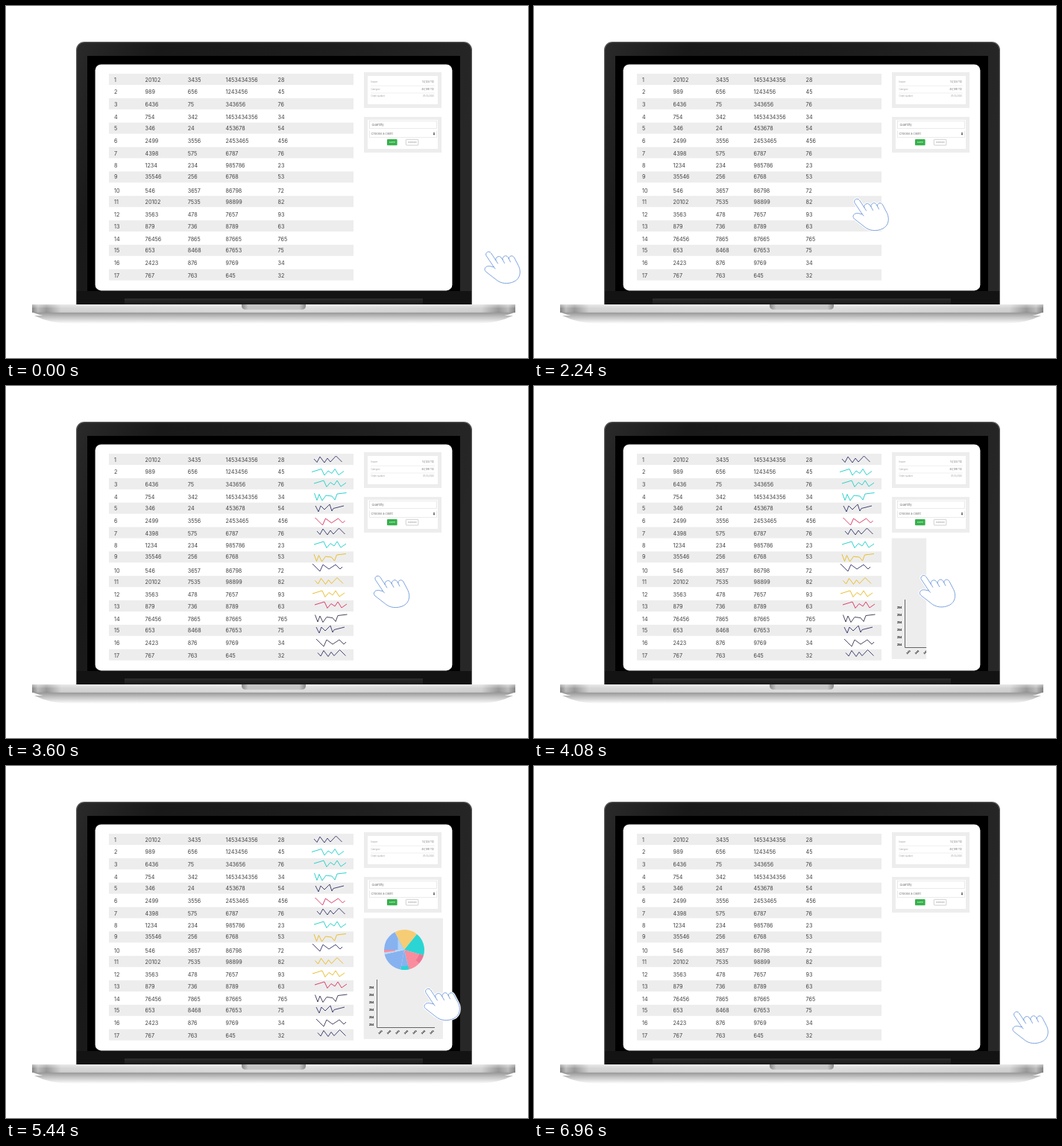
These frames come from a looping animation (700 by 473 pixels, 7.12 s). An HTML page:

```html
<!DOCTYPE html>
<html lang="en">
<head>
<meta charset="utf-8">
<title>Laptop dashboard</title>
<style>
html, body { margin: 0; width: 100%; height: 100%; overflow: hidden; background: #fff; }
svg { display: block; width: 100%; height: 100%; }
text { font-family: Inter, Roboto, sans-serif; fill: #404040; }
.cell { font-size: 7.2px; }
.tiny { font-size: 2.8px; fill: #999; }
.sum { font-size: 3.5px; fill: #777; }
.field { font-size: 4px; fill: #707070; }
.label { font-size: 3.2px; font-weight: 800; fill: #111; }
.line { fill: none; stroke-width: 1; stroke-linejoin: round; }
</style>
</head>
<body>
<svg id="stage" viewBox="0 0 700 473">
  <defs>
    <linearGradient id="lid" x1="0" y1="0" x2="1" y2=".3">
      <stop offset="0" stop-color="#2b2a2b"/><stop offset=".2" stop-color="#1a191a"/>
      <stop offset=".6" stop-color="#1e1d1e"/><stop offset="1" stop-color="#282728"/>
    </linearGradient>
    <linearGradient id="hinge" x2="0" y2="1">
      <stop offset="0" stop-color="#2e2d2e"/><stop offset="1" stop-color="#191819"/>
    </linearGradient>
    <linearGradient id="bar">
      <stop offset="0" stop-color="#858586"/><stop offset=".012" stop-color="#bcbcbd"/>
      <stop offset=".03" stop-color="#9a9a9b"/><stop offset=".06" stop-color="#d4d4d5"/>
      <stop offset=".5" stop-color="#e0e0e1"/><stop offset=".93" stop-color="#d2d2d3"/>
      <stop offset=".965" stop-color="#9a9a9b"/><stop offset=".985" stop-color="#bcbcbd"/>
      <stop offset="1" stop-color="#858586"/>
    </linearGradient>
    <linearGradient id="shade" x2="0" y2="1">
      <stop offset="0" stop-color="#fff" stop-opacity=".5"/><stop offset=".5" stop-color="#fff" stop-opacity="0"/>
      <stop offset="1" stop-color="#000" stop-opacity=".06"/>
    </linearGradient>
    <linearGradient id="under" x2="0" y2="1">
      <stop offset="0" stop-color="#949495"/><stop offset="1" stop-color="#cfcfd0"/>
    </linearGradient>
    <linearGradient id="notch">
      <stop offset="0" stop-color="#8a8a8b"/><stop offset=".1" stop-color="#c6c6c7"/>
      <stop offset=".9" stop-color="#c6c6c7"/><stop offset="1" stop-color="#8a8a8b"/>
    </linearGradient>
    <linearGradient id="floor" x2="0" y2="1">
      <stop offset="0" stop-color="#b4b4b4"/><stop offset="1" stop-color="#fff"/>
    </linearGradient>
    <clipPath id="sparkClip"><rect id="sparkWipe" x="405" y="85" height="290"/></clipPath>
    <clipPath id="panelClip"><rect id="panelWipe" x="479" y="200" height="170"/></clipPath>
    <clipPath id="trendClip"><rect id="trendWipe" x="500" y="280" height="75"/></clipPath>
    <mask id="pieMask" maskUnits="userSpaceOnUse" x="500" y="215" width="70" height="65">
      <circle id="pieWipe" cx="534" cy="247" r="14" fill="none" stroke="#fff" stroke-width="28"
        pathLength="100" transform="rotate(-90 534 247)"/>
    </mask>
  </defs>

  <rect width="700" height="473" fill="#fff"/>
  <path d="M38 416H680Q658 427 630 427H88Q60 427 38 416Z" fill="url(#floor)"/>
  <path d="M94 402V59A11 11 0 0 1 105 48H614A11 11 0 0 1 625 59V402Z" fill="#58585a"/>
  <path d="M95.2 402V59A10 10 0 0 1 105 49.2H614A10 10 0 0 1 623.8 59V402Z" fill="url(#lid)"/>
  <rect x="95.2" y="383" width="528.6" height="19" fill="#141314"/>
  <rect x="109" y="67" width="500" height="316" fill="#000"/>
  <rect x="159" y="393" width="400" height="9" fill="url(#hinge)"/>
  <rect x="119.6" y="78.5" width="478.8" height="303.9" rx="8" fill="#fff"/>
  <path d="M35 411.5H683Q664 419.5 636 419.5H82Q54 419.5 35 411.5Z" fill="url(#under)"/>
  <rect x="35" y="401" width="648" height="11" fill="url(#bar)"/>
  <rect x="35" y="401" width="648" height="11" fill="url(#shade)"/>
  <path d="M316 401H402V403Q402 408 396 408H322Q316 408 316 403Z" fill="url(#notch)"/>

  <g id="table"></g>

  <g id="cards">
    <path d="M480 89h104v48h-104zM480 149h104v48h-104z" fill="#ededed"/>
    <path d="M485 94h94v38h-94zM485 153h94v39h-94z" fill="#fff"/>
    <path d="M489 107.2H575M489 117H575" stroke="#e6e6e6" stroke-width=".6"/>
    <text class="tiny" x="489.5" y="102.5">Import</text>
    <text class="tiny" x="489.5" y="112.5">Category</text>
    <text class="tiny" x="489.5" y="122.2">Order number</text>
    <g text-anchor="end">
      <text class="sum" x="574" y="103">14,124 112</text>
      <text class="sum" x="574" y="113">46,198 112</text>
      <text class="tiny" x="574" y="122.4">07/12/2020</text>
    </g>
    <rect x="487.5" y="154.5" width="90" height="10" fill="none" stroke="#e2e2e2" stroke-width=".7"/>
    <path d="M487.5 167.5V176.5H577.5V167.5" fill="none" stroke="#e2e2e2" stroke-width=".7"/>
    <text class="field" x="490.5" y="161.4">Quantity</text>
    <text class="field" x="489.5" y="173.2">Choose a client</text>
    <path d="M572.7 171.4l1.3-1.8 1.3 1.8zM572.7 172l1.3 1.8 1.3-1.8z" fill="#444"/>
    <rect x="511" y="179" width="13.6" height="8.3" rx="1" fill="#34b14b"/>
    <text x="517.8" y="184.2" text-anchor="middle" style="font-size:2.5px;fill:#fff">Submit</text>
    <rect x="536.3" y="179.3" width="16.6" height="7.8" rx="1" fill="#fff" stroke="#b0b0b0" stroke-width=".6"/>
    <text x="544.6" y="184.2" text-anchor="middle" style="font-size:2.5px;fill:#888">Download</text>
  </g>

  <g id="results">
    <g id="sparks" clip-path="url(#sparkClip)"></g>
    <g id="panel" clip-path="url(#panelClip)">
      <rect x="479.7" y="204.5" width="106.3" height="162.3" fill="#ededed"/>
      <path d="M497.5 287V351.5H575" fill="none" stroke="#555" stroke-width=".9"/>
    </g>
    <g id="pie" mask="url(#pieMask)"></g>
    <g clip-path="url(#trendClip)">
      <path class="line" stroke="#d8365d" d="M504 347L508.5 329.5L515.5 337L519 321L521.5 324L522 317L525 322L526 306L534 318L537 308L547 322V297L553 304V292L558.5 307L560 293L566 293.5L568 288L570 290.5L572 286.5L573.5 287"/>
    </g>
  </g>

  <g id="hand" stroke-linejoin="round" stroke-linecap="round">
    <path id="halo" fill="#fff" stroke="#fff" stroke-width="3"/>
    <path id="outline" fill="#fff" stroke="#7099dc" stroke-width=".9"/>
    <path d="M15 13L17.5 17M24 12L26.5 16.5M32.5 11L34.5 15M12 21.5L14 24" fill="none" stroke="#7099dc" stroke-width=".9"/>
  </g>
</svg>

<script>
const $ = id => document.getElementById(id);

function add(parent, tag, attrs, text) {
  const el = document.createElementNS('http://www.w3.org/2000/svg', tag);
  for (const key in attrs) el.setAttribute(key, attrs[key]);
  if (text !== undefined) el.textContent = text;
  return $(parent).appendChild(el);
}

// Each row: vertical centre, then its values
const rows = `99 20102 3435 1453434356 28
115.5 989 656 1243456 45
132 6436 75 343656 76
149 754 342 1453434356 34
164.2 346 24 453678 54
181 2499 3556 2453465 456
198 4398 575 6787 76
214.5 1234 234 985786 23
229.7 35546 256 6768 53
248 546 3657 86798 72
263.2 20102 7535 98899 82
280 3563 478 7657 93
296.8 879 736 8789 63
313.6 76456 7865 87665 765
328.8 653 8468 67653 75
345.5 2423 876 9769 34
362.2 767 763 645 32`.split('\n');
const columns = [145, 186.5, 243.7, 294.5, 364.5];

rows.forEach((row, i) => {
  const [mid, ...values] = row.split(' ');
  if (i % 2 === 0) add('table', 'rect', { x: 138, y: 91 + i * 16.42, width: 328, height: 15, fill: '#ededed' });
  [i + 1, ...values].forEach((value, c) =>
    add('table', 'text', { class: 'cell', x: columns[c], y: +mid + 2.6 }, value));
});

// Sparkline shapes, relative to their first point
const shapes = {
  A: 'l4 4.5 4-7.5 6 8 4-6 4 5 7.5-8 8 8',
  B: 'l13-4 4 8.5 5-6 5 3.5 4-6 5 8 7-5',
  C: 'l3.5 9.5 3-8 4 8.5 5-7 8 1 4 5 3-8 12.5-1.5',
  D: 'l4 8 3-8 5 5 7-7 3 9 2-3.5 14-3.5',
  E: 'l10 10 4-9 8 6 9-6 6 6 3-3'
};
const navy = '#444477', ink = '#47475f', cyan = '#2bd3cd', gold = '#eabf30', red = '#de406a';
[['A', 413, 98, navy], ['B', 410, 115.5, cyan], ['B', 413, 131, cyan], ['C', 413.5, 144, cyan],
 ['D', 415, 161, navy], ['E', 414.5, 177, red], ['A', 417, 195, navy], ['B', 413, 213, cyan],
 ['C', 413, 226, gold], ['E', 411, 239, navy], ['A', 414.5, 261.5, gold], ['B', 411, 279, gold],
 ['B', 414, 294, red], ['C', 414.5, 307.5, ink], ['D', 416, 324, navy], ['E', 416, 340, ink],
 ['A', 418, 358.5, navy]
].forEach(([shape, x, y, stroke]) =>
  add('sparks', 'path', { class: 'line', d: `M${x} ${y}${shapes[shape]}`, stroke }));

for (let i = 0; i < 6; i++) add('panel', 'text', { class: 'label', x: 487, y: 299.2 + i * 9.9 }, '254');
for (let i = 0; i < 7; i++) {
  const x = 502 + i * 11.5;
  add('panel', 'text', { class: 'label', x, y: 358.8, 'text-anchor': 'middle', transform: `rotate(-45 ${x} 357.6)` }, '345');
}

function slice(from, to, fill, inner = 0, outer = 27) {
  const at = (deg, r) => {
    const a = deg * Math.PI / 180;
    return `${534 + r * Math.sin(a)} ${247 - r * Math.cos(a)}`;
  };
  add('pie', 'path', {
    fill,
    d: `M${at(from, inner)}L${at(from, outer)}A${outer} ${outer} 0 0 1 ${at(to, outer)}L${at(to, inner)}` +
       `A${inner} ${inner} 0 0 0 ${at(from, inner)}Z`
  });
}
slice(-28, 39, '#f6cd74');
slice(39, 106, '#2bd5d3');
slice(106, 166, '#f98d9e');
slice(106, 132, '#ee7593', 21);
slice(166, 190, '#86b2ef');
slice(166, 190, '#2bd5d3', 22);
slice(190, 257, '#86b2ef');
slice(257, 270, '#b8d8f8');
slice(263, 270, '#f98d9e', 12);
slice(270, 332, '#86b2ef');
add('pie', 'path', { d: 'M534 247L525.5 231.5V247Z', fill: '#aed3f8' });

const palm = 'M12 21.5L2 6.5C0 2.5 5.5-1 8.5 3L15 13C13.5 9 19 5.5 22 9L24 12C23 8 28.5 4.5 31 8.5' +
  'L32.5 11C32 7 37 5 39.5 9L45.5 20.5C49 28 47.5 37 40 41C31 45.5 21 44 15 38.5L1.5 28C-2 24.5 1 20 6 20.5Z';
$('halo').setAttribute('d', palm);
$('outline').setAttribute('d', palm);

// Keys are [step, value, ...]; one step lasts 80 ms
const handKeys = [
  [0, 642, 329], [12, 428.5, 258.3], [13, 428, 258], [16, 432, 257.5], [18, 437, 257], [27, 479, 254],
  [32, 503, 254], [33, 503, 254], [42, 546, 252], [49, 556, 255], [51, 559, 276], [53, 561, 298],
  [57, 572, 338], [60, 588, 338], [64, 605.5, 334], [69, 628, 331], [72, 642, 329]
];
const sparkKeys = [[13, 4], [18, 16.5], [26, 57]];
const panelKeys = [[33, 0], [40, 110]];
const pieKeys = [[42, 0], [51, 100]];
const trendKeys = [[53, 0], [60, 78]];
const fadeKeys = [[69, 1], [72, 0]];

function tween(keys, k) {
  const n = keys.findIndex(key => key[0] >= k);
  if (n < 0) return keys[keys.length - 1].slice(1);
  if (n === 0) return keys[0].slice(1);
  const a = keys[n - 1], b = keys[n], u = (k - a[0]) / (b[0] - a[0]);
  return a.slice(1).map((v, i) => v + (b[i + 1] - v) * u);
}

function draw(ms) {
  const k = Math.max(0, Math.floor((ms - 1280) / 80) + 1);
  const [x, y] = tween(handKeys, k);
  $('hand').setAttribute('transform', `translate(${x} ${y})`);
  $('sparkWipe').setAttribute('width', tween(sparkKeys, k)[0]);
  $('panelWipe').setAttribute('width', tween(panelKeys, k)[0]);
  $('trendWipe').setAttribute('width', tween(trendKeys, k)[0]);
  const turn = tween(pieKeys, k)[0];
  $('pieWipe').setAttribute('stroke-dasharray', turn >= 100 ? 'none' : `${turn} 200`);
  $('pie').style.display = turn > 0 ? '' : 'none';
  $('results').setAttribute('opacity', tween(fadeKeys, k)[0]);
}

const start = performance.now();
function tick() {
  draw((performance.now() - start) % 7120);
  requestAnimationFrame(tick);
}
draw(0);
requestAnimationFrame(tick);
</script>
</body>
</html>
```
